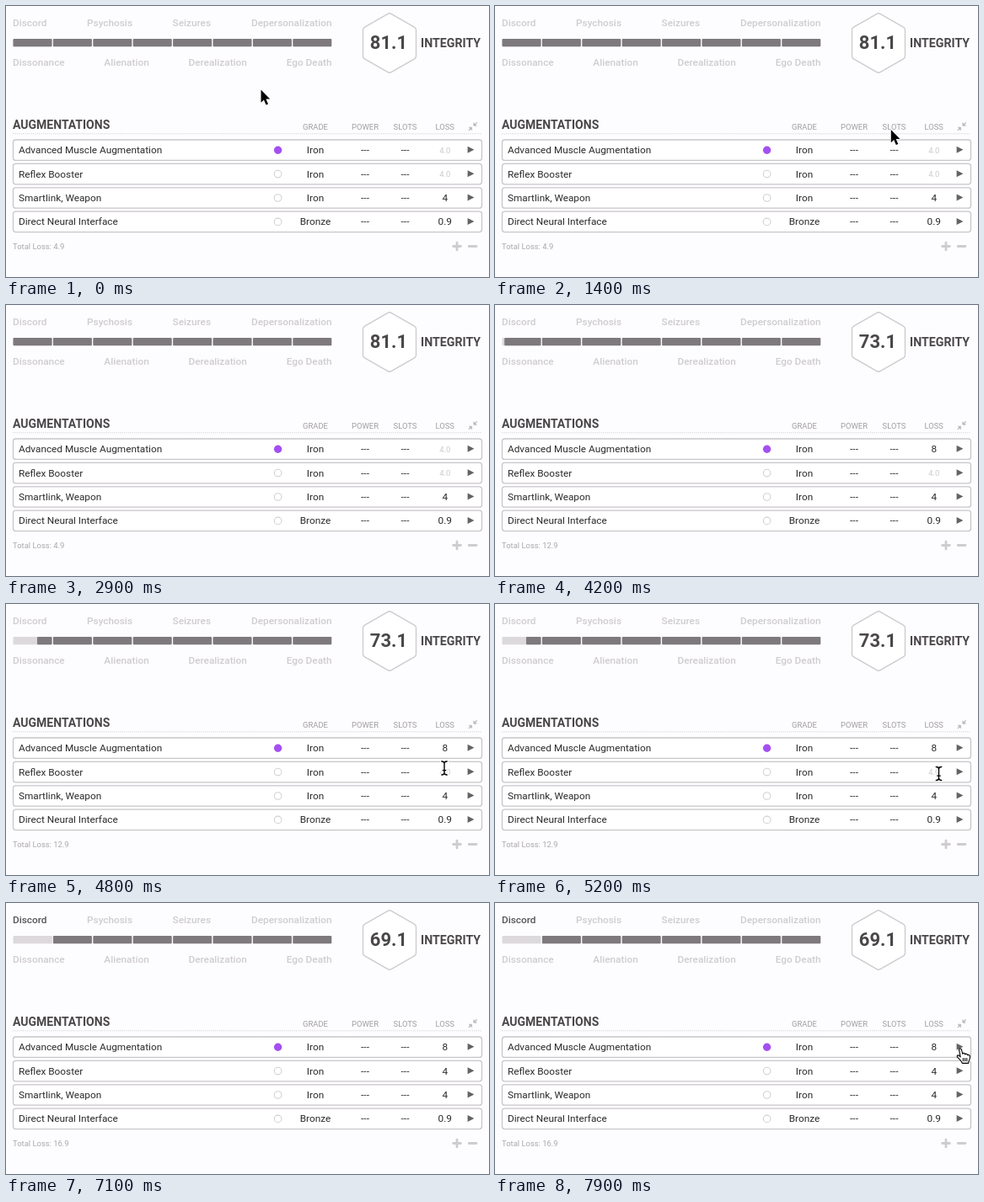
Write an HTML page that moves like this. It is 573x322 px and loops after 8000 ms.

```html
<!DOCTYPE html>
<html lang="en">
<head>
<meta charset="utf-8">
<title>Augmentations</title>
<style>
  html, body { margin: 0; width: 100%; height: 100%; overflow: hidden; background: #fdfcfe; }
  svg { display: block; width: 573px; height: 322px; }
  text { font-family: Roboto, Arial, sans-serif; white-space: pre; }
  .stage { font-size: 11.8px; font-weight: 500; fill: #cfcccf; }
  .stage.on { fill: #555254; }
  .title { font-weight: 700; fill: #4a4748; }
  .head { font-size: 9.45px; fill: #a09da0; }
  .cell { font-size: 11.8px; fill: #2c2a2b; }
  .hint { font-size: 9.45px; fill: #cdcacd; }
  .total { font-size: 9.45px; fill: #aba8ab; }
  .mid { text-anchor: middle; }
  .end { text-anchor: end; }
</style>
</head>
<body>
<svg id="app" viewBox="0 0 573 322">
  <path d="M453 9.3 Q455 8.1 457 9.3 L484.5 25.2 Q486.5 26.4 486.5 28.6 V59.4 Q486.5 61.6 484.5 62.8 L457 78.7 Q455 79.9 453 78.7 L425.5 62.8 Q423.5 61.6 423.5 59.4 V28.6 Q423.5 26.4 425.5 25.2 Z"
    fill="#fff" stroke="#cfcccf" stroke-width="1.4"/>
  <path d="M8 151.8 H564" stroke="#d3d0d3" stroke-width="1" stroke-dasharray="1.2 1.2"/>
  <g fill="#bbb8bb" stroke="#bbb8bb" stroke-width="1.3" stroke-linecap="round">
    <path d="M558.3 138.8 L556 141.1 M549.2 147.6 L551.5 145.3"/>
    <path d="M554.9 139.2 V142.2 H557.9 Z M552.6 147.2 V144.2 H549.6 Z" stroke-width=".8" stroke-linejoin="round"/>
  </g>
  <path d="M530.6 285.5 H539.4 M535 281.1 V289.9 M549.2 285.5 H558" stroke="#cfcccf" stroke-width="2.8" stroke-linecap="round"/>
  <g id="scene"></g>
  <rect id="caret" width="1" height="14" fill="#333"/>
  <circle id="ring" r="20.5" fill="#000" fill-opacity=".13"/>
  <g id="arrow" stroke-linejoin="round">
    <path d="M0 0 V15.2 L3.4 12 L6 18 L8.5 17 L5.9 11.1 H10.7 Z" fill="#000" stroke="#fff" stroke-width="1.3" paint-order="stroke"/>
  </g>
  <g id="beam" fill="none" stroke-linecap="round">
    <path id="beamShape" d="M-3.2 -8 Q0 -8 0 -5.6 Q0 -8 3.2 -8 M0 -5.6 V5.6 M-3.2 8 Q0 8 0 5.6 Q0 8 3.2 8 M-1.8 2.6 H1.8" stroke="#fff" stroke-width="3.6"/>
    <use href="#beamShape"/>
    <path d="M-3.2 -8 Q0 -8 0 -5.6 Q0 -8 3.2 -8 M0 -5.6 V5.6 M-3.2 8 Q0 8 0 5.6 Q0 8 3.2 8 M-1.8 2.6 H1.8" stroke="#000" stroke-width="1.4"/>
  </g>
  <g id="hand" stroke="#000" stroke-width="1.1" stroke-linejoin="round" stroke-linecap="round">
    <path fill="#fff" d="M-1.5 1.3 Q-1.2 -.2 .2 0 Q1.3 .2 1.6 1.5 L2.7 6.3 Q3 5.2 4.3 5.4 Q5.5 5.6 5.6 6.9 Q6.2 5.8 7.4 6.2 Q8.6 6.6 8.6 7.8 Q9.6 7 10.7 7.7 Q11.7 8.4 11.5 10.3 Q11.4 13 10 15 L9.7 17.4 H2.3 Q1.6 15.2 -.5 13.2 L-3.6 9.9 Q-4.2 8.6 -3.2 8 Q-2.2 7.6 -1 8.8 L.2 9.8 Z"/>
    <path fill="none" d="M3.4 11.6 V14.8 M5.6 11.6 V14.8 M7.8 11.6 V14.8"/>
  </g>
</svg>
<script>
const $ = id => document.getElementById(id);
const scene = $('scene');

function add(tag, attrs, content) {
  const el = document.createElementNS('http://www.w3.org/2000/svg', tag);
  for (const k in attrs) el.setAttribute(k, attrs[k]);
  if (content) el.textContent = content;
  return scene.appendChild(el);
}
const text = (x, y, cls, str, size) =>
  add('text', { x, y, class: cls, ...(size && { 'font-size': size }) }, str);

// Stage labels and bar
const discord = text(8, 23.6, 'stage', 'Discord');
text(123, 23.6, 'stage mid', 'Psychosis');
text(220.3, 23.6, 'stage mid', 'Seizures');
text(386.5, 23.6, 'stage end', 'Depersonalization');
text(8, 71, 'stage', 'Dissonance');
text(143, 71, 'stage mid', 'Alienation');
text(251.2, 71, 'stage mid', 'Derealization');
text(386.5, 71, 'stage end', 'Ego Death');

const BAR = { x: 8.5, y: 38.9, w: 46, h: 9.4, pitch: 47.4 };
const segment = (i, fill) => add('rect', {
  x: BAR.x + i * BAR.pitch, y: BAR.y, width: BAR.w, height: BAR.h, rx: 1, fill
});
segment(0, '#dcd9dc');
const firstSegment = segment(0, '#7d797c');
for (let i = 1; i < 8; i++) segment(i, '#7d797c');

const integrity = text(454, 51, 'title mid', '', 22);
text(492, 48.6, 'title', 'INTEGRITY', 14.2);

// Table
text(8, 145.5, 'title', 'AUGMENTATIONS', 14);
const COLS = { GRADE: 367, POWER: 426, SLOTS: 473.5, LOSS: 520.7 };
for (const name in COLS) text(COLS[name], 146.6, 'head mid', name);

const ROWS = [
  ['Advanced Muscle Augmentation', 'Iron', ''],
  ['Reflex Booster', 'Iron', ''],
  ['Smartlink, Weapon', 'Iron', '4'],
  ['Direct Neural Interface', 'Bronze', '0.9']
];
const losses = ROWS.map(([name, grade, loss], i) => {
  const y = 171.2 + i * 28.4, base = y + 4;
  add('rect', { x: 8.5, y: y - 12.2, width: 556, height: 24.4, rx: 3, fill: '#fff', stroke: '#c9c6c9', 'stroke-width': 1.3 });
  text(15, base, 'cell', name);
  add('circle', i
    ? { cx: 322.6, cy: y, r: 4.3, fill: 'none', stroke: '#d3d0d3', 'stroke-width': 1.1 }
    : { cx: 322.6, cy: y, r: 4.7, fill: '#a450f0' });
  text(COLS.GRADE, base, 'cell mid', grade);
  text(COLS.POWER, base, 'cell mid', '---');
  text(COLS.SLOTS, base, 'cell mid', '---');
  add('path', { d: `M547.6 ${y - 4.4} l7.8 4 l-7.8 4 Z`, fill: '#656264' });
  return text(COLS.LOSS, base, 'cell mid', loss);
});
const total = text(8, 288.7, 'total', '');

// Pointer track: time, shape, x, y
const POINTER = [
  [0, 'arrow', 302.5, 99.5], [900, 'arrow', 306, 100.5], [1000, 'arrow', 325, 106],
  [1100, 'arrow', 361, 116], [1200, 'arrow', 402, 128], [1300, 'arrow', 440, 138.5],
  [1400, 'arrow', 469.8, 147], [1500, 'arrow', 495, 157], [1600, 'beam', 512, 166],
  [1700, 'beam', 519, 171], [1800, 'beam', 521, 172], [2900, 'none', 0, 0],
  [4800, 'beam', 520, 195], [4900, 'beam', 525, 200], [5000, 'beam', 526.5, 201.5],
  [5700, 'none', 0, 0], [7400, 'arrow', 527, 188], [7500, 'arrow', 546, 181],
  [7600, 'arrow', 561, 176.5], [7800, 'arrow', 556, 174.5], [7900, 'hand', 552, 173]
];
const CLICKS = [[2000, 521, 172], [5100, 526.5, 201.5]];
const CARETS = [[3100, 3500, 164], [3900, 4000, 164], [5900, 6200, 192.5]];

// cubic-bezier(.25, .1, .25, 1)
function ease(p) {
  if (p <= 0 || p >= 1) return p <= 0 ? 0 : 1;
  let lo = 0, hi = 1, s;
  for (let i = 0; i < 20; i++) {
    s = (lo + hi) / 2;
    const x = .75 * s * (1 - s) + s ** 3;
    x < p ? lo = s : hi = s;
  }
  return .3 * s * (1 - s) ** 2 + 3 * s * s * (1 - s) + s ** 3;
}

function place(id, on, x, y) {
  const el = $(id);
  el.setAttribute('visibility', on ? 'visible' : 'hidden');
  if (on) el.setAttribute('transform', `translate(${x} ${y})`);
}

function setLoss(i, value) {
  const str = value || '4.0';
  if (losses[i].textContent === str) return;
  losses[i].textContent = str;
  losses[i].setAttribute('class', value ? 'cell mid' : 'hint mid');
  losses[i].setAttribute('y', 171.2 + i * 28.4 + (value ? 4 : 3.4));
}

function render(t) {
  setLoss(0, t >= 3000 && '8');
  setLoss(1, t >= 5800 && '4');
  total.textContent = 'Total Loss: ' + (t < 4000 ? '4.9' : t < 6500 ? '12.9' : '16.9');
  integrity.textContent = t < 4100 ? '81.1' : t < 6700 ? '73.1' : '69.1';
  discord.setAttribute('class', t < 6700 ? 'stage' : 'stage on');

  const gone = 28.5 * ease((t - 4150) / 500) + (BAR.w - 28.5) * ease((t - 6650) / 500);
  firstSegment.setAttribute('x', BAR.x + gone);
  firstSegment.setAttribute('width', Math.max(0, BAR.w - gone));

  const [, shape, x, y] = POINTER.findLast(p => p[0] <= t);
  for (const id of ['arrow', 'beam', 'hand']) place(id, id === shape, x, y);

  const click = CLICKS.find(c => t >= c[0] && t < c[0] + 100);
  place('ring', click, click && click[1], click && click[2]);
  const caret = CARETS.find(c => t >= c[0] && t < c[1]);
  place('caret', caret, 524.5, caret && caret[2]);
}

const LOOP = 8000, STEP = 100;
const start = performance.now();
function tick() {
  const t = (performance.now() - start) % LOOP;
  render(Math.floor(t / STEP) * STEP);
  requestAnimationFrame(tick);
}
tick();
</script>
</body>
</html>
```
